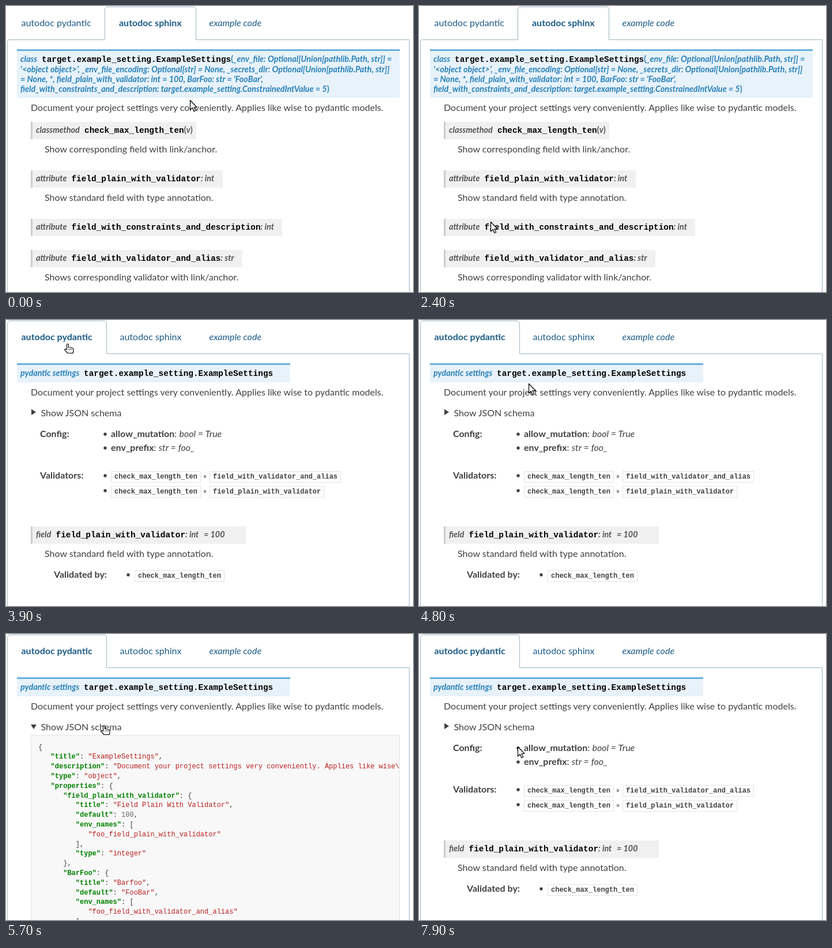
An HTML page that plays this animation: 706x496 px, repeating every 8 s.

```html
<!DOCTYPE html>
<html lang="en">
<head>
<meta charset="utf-8">
<title>Autodoc tabs</title>
<style>
html, body { margin: 0; width: 100%; height: 100%; overflow: hidden; background: #fff; }
svg { display: block; }
text { font: 16px Lato, sans-serif; fill: #404040; white-space: pre; }
b, .b { font-weight: 700; }
.i { font-style: italic; }
.tab text { fill: #1d5c87; }
.tab path { fill: #fff; stroke: #a0b3bf; }
.sig, .attr { font-size: 14.4px; font-weight: 700; }
.sig { fill: #2980b9; }
.attr { fill: #555; }
.name { font-family: "Liberation Mono", monospace; font-style: normal; fill: #000; }
.head { fill: #e7f2fa; }
.bar { fill: #6ab0de; }
.box { fill: #f0f0f0; }
.edge { fill: #ccc; }
.chip rect { fill: #fff; stroke: #e1e4e5; }
.chip text, .json text { font: 12px "Liberation Mono", monospace; }
.chip text { font-weight: 700; }
.json .key { fill: #008000; font-weight: 700; }
.json .str { fill: #ba2121; }
.json .num { fill: #666; }
.dot, .tri { fill: #404040; }
.cursor path { fill: #fff; stroke: #000; stroke-width: 1.2; stroke-linejoin: round; }
</style>
</head>
<body>
<svg width="706" height="496" viewBox="0 0 706 496">
  <defs>
    <clipPath id="jsonClip"><rect x="44" y="176" width="638" height="330"/></clipPath>
  </defs>

  <g id="sphinx">
    <g class="tab">
      <path d="M2.5 500V61.5Q2.5 58.5 5.5 58.5H171.5V6.5Q171.5 1.5 176.5 1.5H324.5Q329.5 1.5 329.5 6.5V58.5H699.5V500"/>
      <text x="26.5" y="35">autodoc pydantic</text>
      <text x="196" y="35" class="b">autodoc sphinx</text>
      <text x="352.5" y="35" class="i">example code</text>
    </g>
    <rect class="head" x="19" y="75" width="664" height="84"/>
    <rect class="bar" x="19" y="75" width="664" height="3"/>
    <text class="sig i" x="25" y="97">class<tspan class="name" x="62">target.example_setting.ExampleSettings</tspan><tspan font-style="normal">(</tspan>_env_file: Optional[Union[pathlib.Path, str]] =</text>
    <text class="sig i" x="25" y="114.5">'&lt;object object&gt;', _env_file_encoding: Optional[str] = None, _secrets_dir: Optional[Union[pathlib.Path, str]]</text>
    <text class="sig i" x="25" y="131.5">= None, *, field_plain_with_validator: int = 100, BarFoo: str = 'FooBar',</text>
    <text class="sig i" x="25" y="149">field_with_constraints_and_description: target.example_setting.ConstrainedIntValue = 5<tspan font-style="normal">)</tspan></text>
    <text x="43" y="182">Document your project settings very conveniently. Applies like wise to pydantic models.</text>

    <rect class="box" x="43" y="201" width="287" height="30"/>
    <rect class="edge" x="43" y="201" width="3" height="30"/>
    <text class="attr i" x="52" y="220">classmethod<tspan class="name" x="136">check_max_length_ten</tspan><tspan font-style="normal">(</tspan>v<tspan font-style="normal">)</tspan></text>
    <text x="67" y="254">Show corresponding field with link/anchor.</text>

    <rect class="box" x="43" y="285" width="333" height="30"/>
    <rect class="edge" x="43" y="285" width="3" height="30"/>
    <text class="attr i" x="52" y="304">attribute<tspan class="name" x="113.4">field_plain_with_validator</tspan>: int</text>
    <text x="67" y="338">Show standard field with type annotation.</text>

    <rect class="box" x="43" y="369" width="436" height="30"/>
    <rect class="edge" x="43" y="369" width="3" height="30"/>
    <text class="attr i" x="52" y="388">attribute<tspan class="name" x="113.4">field_with_constraints_and_description</tspan>: int</text>

    <rect class="box" x="43" y="423" width="367" height="30"/>
    <rect class="edge" x="43" y="423" width="3" height="30"/>
    <text class="attr i" x="52" y="442">attribute<tspan class="name" x="113.4">field_with_validator_and_alias</tspan>: str</text>
    <text x="67" y="476">Shows corresponding validator with link/anchor.</text>
  </g>

  <g id="pydantic">
    <g class="tab">
      <path d="M2.5 500V6.5Q2.5 1.5 7.5 1.5H169.5Q174.5 1.5 174.5 6.5V58.5H699.5V500"/>
      <text x="26.5" y="35" class="b">autodoc pydantic</text>
      <text x="197.5" y="35">autodoc sphinx</text>
      <text x="352.5" y="35" class="i">example code</text>
    </g>
    <rect class="head" x="19" y="75" width="474" height="33"/>
    <rect class="bar" x="19" y="75" width="474" height="3"/>
    <text class="sig i" x="25" y="97">pydantic settings<tspan class="name" x="135">target.example_setting.ExampleSettings</tspan></text>
    <g id="anchor" fill="none" stroke="#404040" stroke-width="2" transform="rotate(45 481 91.5)">
      <rect x="474" y="89" width="8" height="5" rx="2.5"/>
      <rect x="480" y="89" width="8" height="5" rx="2.5"/>
    </g>
    <text x="43" y="131">Document your project settings very conveniently. Applies like wise to pydantic models.</text>
    <text x="60.5" y="167">Show JSON schema</text>

    <g id="closed">
      <path class="tri" d="M44 154.5L52 159.7L44 165Z"/>
      <text class="b" x="59" y="203">Config:</text>
      <text x="182" y="203"><tspan class="b">allow_mutation</tspan>: <tspan class="i">bool = True</tspan></text>
      <text x="182" y="227"><tspan class="b">env_prefix</tspan>: <tspan class="i">str = foo_</tspan></text>
      <text class="b" x="59" y="275">Validators:</text>
      <text x="342" y="275" style="font-size:14px">»</text>
      <text x="342" y="301" style="font-size:14px">»</text>
      <rect class="box" x="43" y="358" width="373" height="30"/>
      <rect class="edge" x="43" y="358" width="3" height="30"/>
      <text class="attr i" x="52" y="377">field<tspan class="name" x="86.5">field_plain_with_validator</tspan>: int<tspan x="343">= 100</tspan></text>
      <text x="67" y="411">Show standard field with type annotation.</text>
      <text class="b" x="83" y="447">Validated by:</text>
    </g>

    <g id="open">
      <path class="tri" d="M43 157H53L48 165Z"/>
      <rect x="43.5" y="175.5" width="639" height="340" fill="#f8f8f8" stroke="#e1e4e5"/>
      <g id="json" class="json" clip-path="url(#jsonClip)"></g>
    </g>
  </g>

  <g id="cursor" class="cursor">
    <path id="arrow" d="M.5 .5V17L4.3 13.5L7 19.7L9.7 18.5L7 12.5H12Z"/>
    <g id="hand" transform="translate(-6 -1)">
      <path d="M4.5 10.5V2A1.5 1.5 0 0 1 7.5 2V6.5L14 7.5Q16 7.8 16 9.8V13L15 16.5H6L1 11.2Q.2 9.5 2 9.3Z"/>
      <path d="M8 9V11M10.5 9V11M13 9V11" style="stroke-width:.9"/>
    </g>
  </g>
</svg>
<script>
const $ = id => document.getElementById(id);
const NS = 'http://www.w3.org/2000/svg';

function add(parent, tag, attrs, content = '') {
  const el = document.createElementNS(NS, tag);
  for (const key in attrs) el.setAttribute(key, attrs[key]);
  el.textContent = content;
  return parent.appendChild(el);
}

function chip(x, baseline, label) {
  const g = add($('closed'), 'g', { class: 'chip' });
  add(g, 'rect', { x: x + .5, y: baseline - 12.5, width: label.length * 7.2 + 11, height: 19 });
  add(g, 'text', { x: x + 6, y: baseline }, label);
}

chip(182, 275, 'check_max_length_ten');
chip(353, 275, 'field_with_validator_and_alias');
chip(182, 301, 'check_max_length_ten');
chip(353, 301, 'field_plain_with_validator');
chip(223, 447, 'check_max_length_ten');
for (const [cx, cy] of [[172, 198], [172, 222], [172, 270], [172, 296], [212, 442]])
  add($('closed'), 'circle', { class: 'dot', cx, cy, r: 2.7 });

const schema = {
  title: 'ExampleSettings',
  description: 'Document your project settings very conveniently. Applies like wise\nto pydantic models.',
  type: 'object',
  properties: {
    field_plain_with_validator: {
      title: 'Field Plain With Validator',
      default: 100,
      env_names: ['foo_field_plain_with_validator'],
      type: 'integer'
    },
    BarFoo: {
      title: 'Barfoo',
      default: 'FooBar',
      env_names: ['foo_field_with_validator_and_alias']
    }
  }
};

JSON.stringify(schema, null, 3).split('\n').slice(0, 19).forEach((line, row) => {
  const text = add($('json'), 'text', { x: 56, y: 199.5 + row * 16.8 });
  for (const part of line.match(/"[^"]*"(?=:)|"[^"]*"|\d+|[^"\d]+/g)) {
    const isKey = part[0] === '"' && line.includes(part + ':');
    const type = isKey ? 'key' : part[0] === '"' ? 'str' : /^\d/.test(part) ? 'num' : '';
    add(text, 'tspan', { class: type }, part);
  }
});

// Pointer moves: start time, number of 100 ms steps, end x, end y
const STEP = 100, LOOP = 8000;
const moves = [
  [600, 1, 366, 121], [800, 1, 423, 118], [1300, 1, 416, 111], [1400, 1, 423, 114],
  [1600, 9, 124, 374], [2500, 3, 171, 89], [2800, 1, 170, 95],
  [3300, 1, 177, 92], [3400, 4, 107, 42],
  [4200, 1, 108, 80], [4300, 1, 110, 102], [4500, 1, 110, 103],
  [4700, 1, 150, 113], [4800, 1, 190, 110], [4900, 1, 215, 101],
  [5100, 4, 195, 162], [5600, 1, 170, 159], [7800, 1, 169, 180], [7900, 1, 171, 195]
];

function pointer(time) {
  let x = 319, y = 163;
  for (const [start, steps, toX, toY] of moves) {
    if (time < start) break;
    const p = Math.min(1, (Math.floor((time - start) / STEP) + 1) / steps);
    const eased = p * p * (3 - 2 * p);
    x += (toX - x) * eased;
    y += (toY - y) * eased;
  }
  return [Math.round(x), Math.round(y)];
}

const show = (id, on) => { $(id).style.display = on ? '' : 'none'; };

function draw(now) {
  const time = now % LOOP;
  const [x, y] = pointer(time);
  const second = time >= 3900;
  const expanded = time >= 5700 && time < 7400;
  const link = y < 58 || (second && y > 150 && y < 172);
  show('sphinx', !second);
  show('pydantic', second);
  show('open', expanded);
  show('closed', !expanded);
  show('anchor', y > 75 && y < 108);
  show('hand', link);
  show('arrow', !link);
  $('cursor').setAttribute('transform', `translate(${x} ${y})`);
}

const begin = performance.now();
function tick() {
  draw(performance.now() - begin);
  requestAnimationFrame(tick);
}
tick();
</script>
</body>
</html>
```
